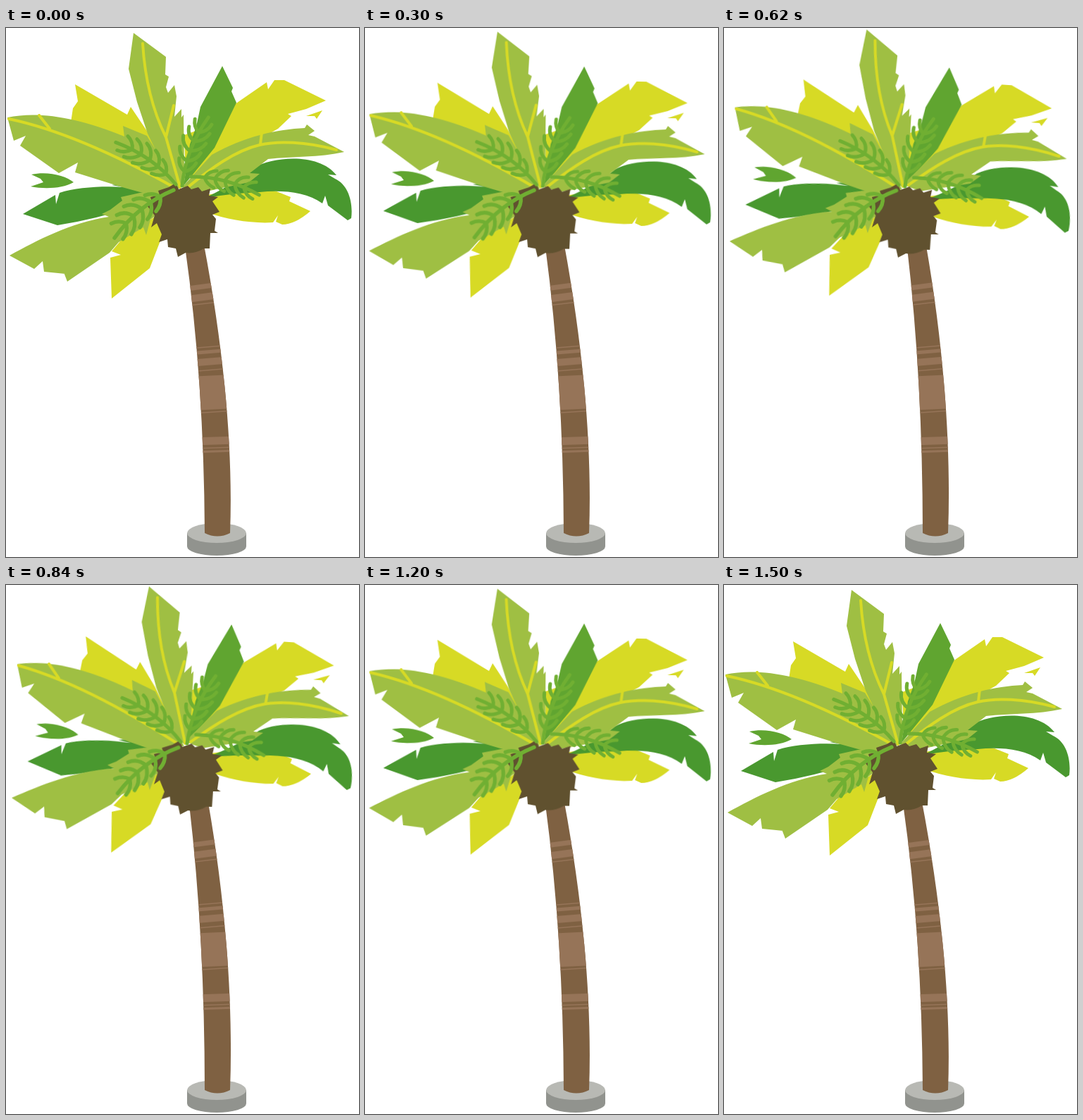
These frames come from a looping animation (501 by 751 pixels, 1.52 s). An HTML page without scripts:

```html
<!DOCTYPE html>
<html lang="en">
<head>
<meta charset="utf-8">
<title>Swaying palm</title>
<style>
  html, body { margin: 0; width: 100%; height: 100%; overflow: hidden; background: #fff; }
  svg { display: block; width: 501px; height: 751px; }

  .sway, .trunk {
    animation: sway 1520ms cubic-bezier(.5, 0, .5, 1) infinite;
    transform-origin: 248px 228px;
  }
  .trunk { animation-name: bend; }

  /* out for 750 ms, back for 750 ms, then a 20 ms rest */
  @keyframes sway {
    0%, 98.684%, 100% { transform: translate(0, 0) rotate(0deg) skewX(0deg); }
    49.342% { transform: translate(var(--x, 7px), var(--y, 1px)) rotate(var(--a)) skewX(var(--k, 0deg)); }
  }
  @keyframes bend {
    0%, 98.684%, 100% { d: path("M254 310Q281 500 282 717Q300 726 318 717C323 585 306 440 281 308Z"); }
    49.342% { d: path("M260 310Q282 500 282 717Q300 726 318 717C323 585 310 440 287 308Z"); }
  }

  .light { fill: #9fbf43; }
  .yellow { fill: #d7da25; }
  .mid { fill: #60a530; }
  .dark { fill: #49982f; }
  .vein { fill: none; stroke: #d7da25; stroke-width: 4; stroke-linecap: round; stroke-linejoin: round; }
  .ferns { fill: none; stroke: #70af32; stroke-width: 5; stroke-linecap: round; }
  .bands { fill: none; stroke: #967458; }
</style>
</head>
<body>
<svg viewBox="0 0 501 751">
  <defs>
    <clipPath id="trunk">
      <path class="trunk" d="M254 310Q281 500 282 717Q300 726 318 717C323 585 306 440 281 308Z"/>
    </clipPath>
    <path id="fern" d="M0 0Q50-14 104 0
      M20-4q4-11 15-14M20-4q6 9 17 11
      M35-6q4-14 16-17M35-6q6 12 18 14
      M50-7q4-14 17-17M50-7q6 14 18 17
      M65-6q4-13 17-15M65-6q6 13 18 16
      M79-5q5-10 16-12M79-5q6 11 17 13"/>
  </defs>

  <!-- base -->
  <path fill="#91938e" d="M257 717V736a42 13 0 0 0 84 0V717Z"/>
  <ellipse cx="299" cy="717" rx="42" ry="14" fill="#b8b9b4"/>

  <!-- trunk -->
  <g clip-path="url(#trunk)">
    <path fill="#7f6142" d="M240 300H330V730H240Z"/>
    <g class="bands">
      <path stroke-width="7" d="M250 371L310 363"/>
      <path stroke-width="10" d="M250 386L310 378"/>
      <path stroke-width="1.5" d="M250 395L310 388M260 455L320 450M260 488L320 483"/>
      <path stroke-width="5" d="M260 462L320 457"/>
      <path stroke-width="10" d="M260 476L320 471"/>
      <path stroke-width="48" d="M260 519L325 516"/>
      <path stroke-width="1.5" d="M265 547L325 543M265 597L325 595"/>
      <path stroke-width="11" d="M265 587L325 585"/>
      <path stroke-width="3" d="M265 602L325 600"/>
    </g>
  </g>

  <!-- back leaves -->
  <path class="sway yellow" style="--a:2.9deg" d="M150 384L148 326 163 322 150 317 166 298 200 276 235 250 221 297 204 341Z"/>
  <path class="sway yellow" style="--a:2.3deg;--x:2.5px" d="M285 237L350 226 384 232 404 240 402 246 432 260Q410 279 392 279L383 275 386 266 379 276C350 278 315 272 285 262Z"/>
  <path class="sway yellow" style="--a:3.2deg" d="M98 80L172 123 177 112 200 146 240 218 160 180 92 134 95 114 102 104Z"/>
  <path class="sway yellow" style="--a:4deg;--x:3.5px;--y:-3px" d="M328 106L370 77 372 87 381 74 395 74 454 103 426 115 400 122 405 125 386 143 320 180 255 215 253 152 272 145ZM426 125L449 117 441 129 438 125Z"/>
  <path class="sway mid" style="--a:2.8deg;--x:5px;--y:-1px" d="M307 54L322 85 320 90 327 106 296 170 252 224 261 165 270 140 276 112Z"/>
  <path class="sway mid" style="--a:4deg;--x:5.7px;--y:4px" d="M36 208C60 203 85 210 96 219C80 228 55 229 35 225L53 219 49 214Z"/>
  <path class="sway dark" style="--a:4.8deg;--x:9px;--y:5px" d="M24 264L70 237 71 250 76 234C100 226 138 224 168 226L150 223 182 218 220 234 175 255Q130 271 73 280Z"/>
  <path class="sway dark" style="--a:4.3deg;--x:4.2px;--k:-2deg" d="M285 240Q330 218 352 198C380 182 445 177 469 209L457 208 467 214C485 222 493 246 490 270L485 273 457 252 453 238 449 249C425 232 390 230 360 233Q325 234 285 241Z"/>

  <!-- front leaves -->
  <path class="sway light" style="--a:5.4deg;--x:11px;--y:2px" d="M5 323C45 301 90 277 146 268L136 264 148 258 165 245 163 240 190 234 240 230 218 262 205 272 199 294 195 283 160 304 147 319 87 360 82 347 84 349 54 346 52 331 40 342Z"/>
  <g class="sway" style="--a:3.5deg;--x:4px;--y:-4px">
    <path class="light" d="M480 176L438 154 429 152 438 146 427 137 424 142C385 144 340 153 292 180L250 226 275 234 345 219 360 207 346 206 372 186C405 182 445 184 480 176Z"/>
    <path class="vein" d="M469 173C425 161 385 160 360 166C325 174 290 200 258 226M363 148L361 165"/>
  </g>
  <g class="sway" style="--a:3.8deg">
    <path class="light" d="M2 127C45 118 100 126 168 154L166 139 200 153 246 228 205 237 165 226 98 205 102 191 75 206 20 167 28 153 11 160Z"/>
    <path class="vein" d="M4 129C80 145 160 182 240 227M47 124L62 143"/>
  </g>
  <g class="sway" style="--a:3.9deg;--x:7.3px;--y:-1px">
    <path class="light" d="M181 7L227 41 226 66 231 69 227 84 230 92 239 81 242 97 239 126 249 115 249 127 252 123 253 200 247 228 235 220 201 150 186 105 174 58Z"/>
    <path class="vein" d="M194 22C197 70 207 115 227 155L247 226M238 110L227 155"/>
  </g>

  <!-- heart -->
  <path class="sway" style="--x:5.5px;--a:1.4deg" fill="#60512f" d="M231 226L241 220 245 229 258 224 263 229 273 226 278 232 290 228 288 238 301 240 293 246 303 261 293 265 298 271 296 288 301 291 290 291 289 313 281 313Q268 321 255 319L244 325 241 313 230 311 229 300 217 304 221 293 214 277 206 283 211 266 200 252 208 251 205 240 218 237 216 231Z"/>

  <g class="sway ferns" style="--a:2deg">
    <use href="#fern" transform="translate(241 222) rotate(-145) scale(1 -1)"/>
    <use href="#fern" transform="translate(250 224) rotate(-69)"/>
    <use href="#fern" transform="translate(262 211) rotate(15) scale(.97)"/>
    <use href="#fern" transform="translate(238 230) rotate(141) scale(1.04 -1.1)"/>
  </g>
</svg>
</body>
</html>
```
